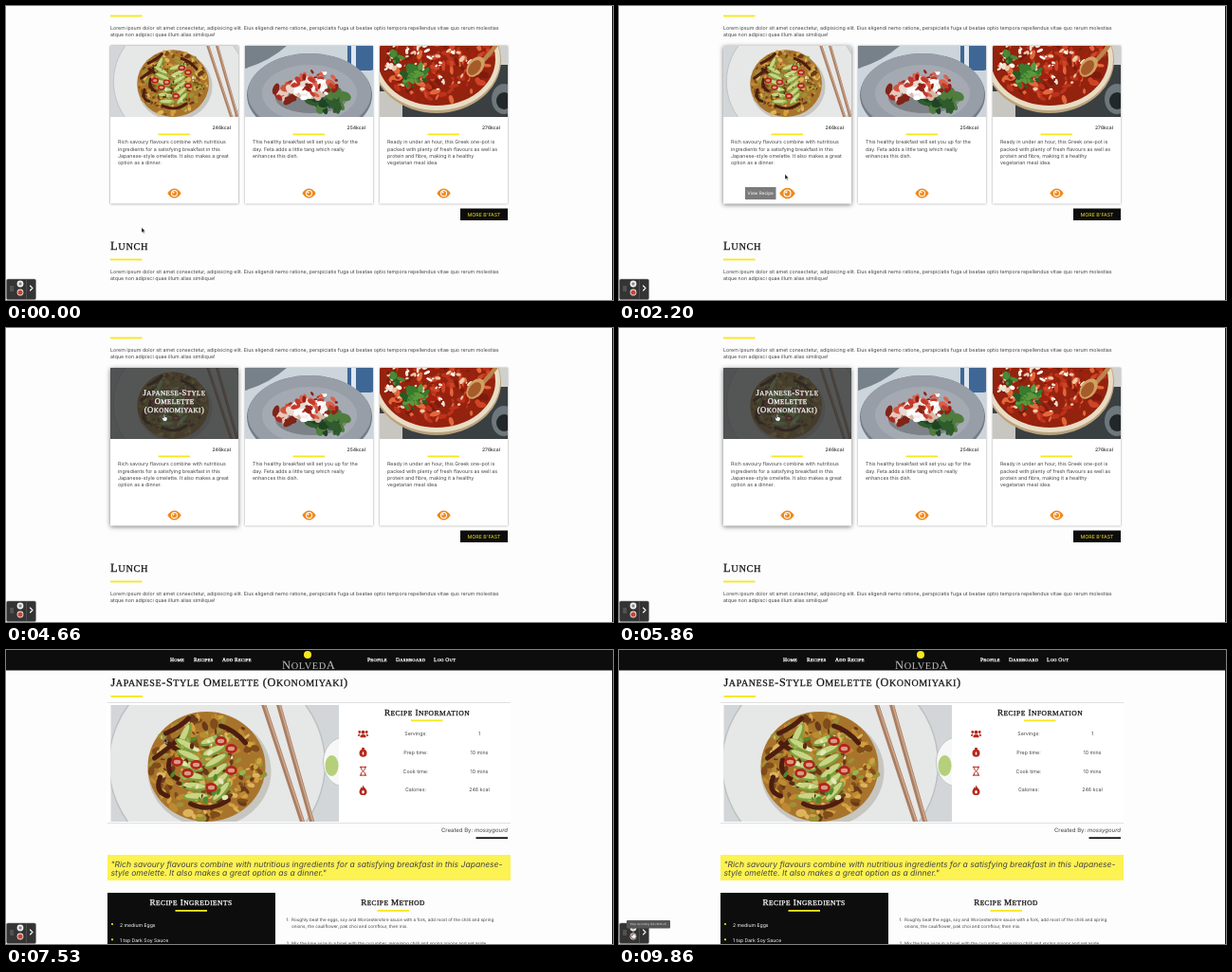
An HTML page for the animation above (10000 ms loop, 640 by 310 pixels).

```html
<!DOCTYPE html>
<html lang="en">
<head>
<meta charset="utf-8">
<title>Recipe cards</title>
<style>
  html, body { margin: 0; height: 100%; overflow: hidden; background: #fdfdfd; }
  #stage { display: block; width: 640px; height: 310px; }
  text { font-family: Inter, sans-serif; fill: #444; white-space: pre; text-rendering: geometricPrecision; }
  .caps { font-family: "Liberation Serif", serif; fill: #111; stroke: #111; stroke-width: .25; letter-spacing: .05em; }
  .light { fill: #fff; stroke: #fff; }
  .mid { text-anchor: middle; }
  .end { text-anchor: end; }
</style>
</head>
<body>
<svg id="stage" viewBox="0 0 640 310"></svg>
<script>
const YELLOW = '#f7e71c', ORANGE = '#f0891c', RED = '#b5291c';

let seed = 7;
const random = () => (seed = (seed * 16807) % 2147483647) / 2147483647;

const rect = (x, y, w, h, fill, more = '') =>
  `<rect x="${x}" y="${y}" width="${w}" height="${h}" fill="${fill}" ${more}/>`;
const oval = (x, y, rx, ry, fill, more = '') =>
  `<ellipse cx="${x}" cy="${y}" rx="${rx}" ry="${ry}" fill="${fill}" ${more}/>`;
const line = (d, color, width, more = '') =>
  `<path d="${d}" fill="none" stroke="${color}" stroke-width="${width}" stroke-linecap="round" ${more}/>`;
const text = (x, y, size, str, more = '') =>
  `<text x="${x}" y="${y}" font-size="${size}" ${more}>${str}</text>`;
const lines = (x, y, size, step, rows, more) =>
  rows.map((row, i) => text(x, y + i * step, size, row, more)).join('');
const caps = (x, y, size, str, cls = '') => text(x, y, size,
  str.replace(/[a-z]+/g, s => `<tspan font-size="${size * .82}">${s.toUpperCase()}</tspan>`),
  `class="caps ${cls}"`);
const rule = (x, y, color = YELLOW) => rect(x, y, 33.5, 1.8, color);

// Irregular food pieces spread over an ellipse
function scatter(n, cx, cy, rx, ry, size, colors) {
  let out = '';
  for (let i = 0; i < n; i++) {
    const a = random() * 6.283, d = Math.sqrt(random());
    const x = cx + Math.cos(a) * d * rx, y = cy + Math.sin(a) * d * ry;
    const w = size * (.5 + random()), h = w * (.35 + random() * .4);
    out += oval(x.toFixed(1), y.toFixed(1), w.toFixed(1), h.toFixed(1), colors[i % colors.length],
      `transform="rotate(${random() * 180 | 0} ${x.toFixed(1)} ${y.toFixed(1)})"`);
  }
  return out;
}

function omelette() {
  let out = rect(-40, -10, 320, 150, '#d3d6d8')
    + oval(112, 62, 114, 108, '#e6e7e7', 'stroke="#bcc1c3" stroke-width="1.5"')
    + oval(104, 70, 65, 59, '#a9a397', 'opacity=".5"')
    + oval(101, 65, 62, 58, '#a8742b')
    + scatter(260, 101, 65, 59, 55, 4, ['#d3a040', '#7f4c1a', '#bd8a31', '#dcb45c', '#69391a', '#9a9238'])
    + line('M58 30Q75 22 82 14M46 56Q62 45 78 30M52 76Q46 92 60 96M62 58Q58 72 70 78M60 40L74 50M116 22Q130 26 142 40M84 104Q104 114 124 100',
      '#4d1e10', 5);
  for (let i = 0; i < 13; i++) {
    const x = 78 + (i * 29) % 56, y = 32 + i * 5.4, turn = -65 + (i * 47) % 100;
    out += `<g transform="translate(${x} ${y}) rotate(${turn})">${oval(0, 0, 14, 4.5, '#7d9f3c')}${oval(0, -1, 12, 3, '#c9d485')}</g>`;
  }
  out += scatter(45, 102, 64, 38, 40, 2.6, ['#4f8a2c', '#8fb950', '#5b2a14', '#e3e9b8']);
  for (const [x, y] of [[116, 38], [127, 46], [90, 63], [81, 72], [127, 69], [106, 87], [70, 60]])
    out += oval(x, y, 5, 3.6, '#d99a80', 'stroke="#b3231d" stroke-width="2.6"');
  return out + line('M160 -4L203 126M176 -4L213 126', '#a97e62', 5) + line('M161 -4L204 126M177 -4L214 126', '#d0aa8e', 1.5)
    + oval(246, 60, 22, 26, '#f6f7f6', 'stroke="#bfc6c6"') + oval(233, 64, 7, 11, '#b5cf7b');
}

const breakfast = () => rect(0, 0, 135, 75, '#ccd5db')
  + '<path d="M0 0H44Q26 16 0 24Z" fill="#76818a"/>'
  + rect(108, -6, 30, 32, '#3f6796', 'rx="6"') + rect(112, 0, 5, 22, '#dfe7ee')
  + oval(68, 52, 66, 44, '#767c86') + oval(68, 50, 65, 42, '#989ea8') + oval(68, 50, 50, 30, '#a5aab2')
  + oval(70, 55, 38, 16, '#7d8288') + scatter(45, 87, 56, 20, 12, 5, ['#2f5b2d', '#4f7d3d', '#1f4424'])
  + scatter(30, 46, 48, 14, 10, 4.5, ['#a82c22', '#d0543f', '#e9c9bb', '#7f2419'])
  + oval(67, 44, 20, 12, '#f1eeea') + scatter(18, 67, 46, 20, 10, 4.5, ['#fff', '#e8dad0', '#d6b9a8'])
  + scatter(45, 74, 41, 24, 14, 3.6, ['#c23a2c', '#dc604c', '#fff', '#8f2219']);

const onePot = () => rect(0, 0, 135, 75, '#3a3f42') + rect(108, 0, 27, 20, '#cfd0cd')
  + rect(0, 48, 24, 27, '#c8c6c0') + oval(131, 56, 13, 16, '#6e777b') + oval(131, 58, 8, 9, '#22272a')
  + oval(60, 15, 68, 56, '#b9a27c') + oval(60, 14, 67, 54, '#e9dcc4') + oval(60, 14, 62, 49, '#93230f')
  + scatter(190, 60, 14, 57, 45, 4, ['#cf4426', '#a3200f', '#e2683b', '#bb331b', '#7f1b0d'])
  + scatter(75, 52, 14, 48, 34, 2.4, ['#fff', '#f2e3d2', '#edc9a8'])
  + scatter(26, 37, 32, 13, 11, 4.2, ['#397a2d', '#59983c', '#265b22'])
  + scatter(9, 18, 12, 8, 6, 4, ['#4a8a35', '#2b6226'])
  + line('M104 20Q116 10 124 -3', '#b9854c', 4.5)
  + oval(101, 22, 8, 12, '#d0a062', 'transform="rotate(38 101 22)"') + oval(100, 23, 5.5, 9, '#a65b2a', 'transform="rotate(38 100 23)"');

const eye = '<path d="M-7.2 0Q-4 -5 0 -5T7.2 0Q4 5 0 5T-7.2 0Z" fill="' + ORANGE + '"/>'
  + oval(0, 0, 3.5, 3.5, '#fff') + oval(0, 0, 2.5, 2.5, ORANGE) + oval(-1, -1, 1, 1, '#fff');

const cards = [
  ['246kcal', `<g transform="translate(4.5 0) scale(.61)">${omelette()}</g>`,
    ['Rich savoury flavours combine with nutritious', 'ingredients for a satisfying breakfast in this', 'Japanese-style omelette. It also makes a great', 'option as a dinner.']],
  ['254kcal', breakfast(),
    ['This healthy breakfast will set you up for the', 'day. Feta adds a little tang which really', 'enhances this dish.']],
  ['276kcal', onePot(),
    ['Ready in under an hour, this Greek one-pot is', 'packed with plenty of fresh flavours as well as', 'protein and fibre, making it a healthy', 'vegetarian meal idea.']]
];

const card = ([kcal, photo, copy], i) => {
  const x = 110 + 142 * i;
  return rect(x, 42, 135, 166.5, '#fff', `id="card${i}" style="filter:drop-shadow(0 .7px .8px #0006)"`)
    + `<svg x="${x}" y="42" width="135" height="75">${photo}</svg>`
    + text(x + 127, 130, 5, kcal, 'class="end" font-weight="600"')
    + rule(x + 50.5, 134.5) + lines(x + 8, 145.2, 5.3, 7.4, copy)
    + `<g id="eye${i}" transform="translate(${x + 67.5} 197.5)">${eye}</g>`;
};

const lorem = ['Lorem ipsum dolor sit amet consectetur, adipisicing elit. Eius eligendi nemo ratione, perspiciatis fuga ut beatae optio tempora repellendus vitae quo rerum molestias',
  'atque non adipisci quae illum alias similique!'];

const listPage = rule(110, 9.6) + lines(110, 25, 5.3, 7.4, lorem) + cards.map(card).join('')
  + `<g id="shade">${rect(110, 42, 135, 75, '#292c2b', 'opacity=".77"')}`
  + ['Japanese-Style', 'Omelette', '(Okonomiyaki)'].map((s, i) => caps(177.5, 71.2 + 9 * i, 8.6, s, 'light mid')).join('') + '</g>'
  + `<g id="tip">${rect(133, 191, 32.5, 13, '#333')}${text(149.2, 199.2, 4.7, 'View Recipe', 'class="mid" style="fill:#fff"')}</g>`
  + rect(479, 213.5, 50, 12.5, '#0c0c0c') + text(504, 221.6, 5.3, "MORE B'FAST", `class="mid" style="fill:${YELLOW}"`)
  + caps(110, 256.8, 12.6, 'Lunch') + rule(110, 266.5) + lines(110, 282, 5.3, 7.4, lorem);

const flame = '<path d="M0 -5C1 -2 4 -1 4 2A4 3.6 0 0 1 -4 2C-4 0 -2.5 -1 -2 -3L-1 -2Z" fill="' + RED + '"/>' + oval(0, 2.3, 1.3, 1.8, '#fff');
const icons = [
  oval(0, -1.6, 1.9, 1.9, RED) + oval(-3.7, -1.8, 1.4, 1.4, RED) + oval(3.7, -1.8, 1.4, 1.4, RED)
    + `<path d="M-3 4V2Q-2 .8 0 .8T3 2V4ZM-5.7 2.5Q-5.5 0 -3.2 .2L-3.7 2.5ZM5.7 2.5Q5.5 0 3.2 .2L3.7 2.5Z" fill="${RED}"/>`,
  oval(0, .8, 4, 4, RED) + rect(-1.4, -5, 2.8, 2.5, RED) + oval(0, 1, .8, 1.7, '#fff'),
  line('M-3.2 -4.4H3.2M-3.2 4.4H3.2M-2.5 -4.4Q-2.5 -1.5 0 0Q2.5 1.5 2.5 4.4M2.5 -4.4Q2.5 -1.5 0 0Q-2.5 1.5 -2.5 4.4', RED, 1),
  flame
];
const facts = [['Servings:', '1'], ['Prep time:', '10 mins'], ['Cook time:', '10 mins'], ['Calories:', '246 kcal']];
const nav = [[173, 'Home'], [198, 'Recipes'], [228, 'Add Recipe'], [381, 'Profile'], [411, 'Dashboard'], [451, 'Log Out']];

const recipePage = rect(0, 0, 640, 21.5, '#0d0d0d') + nav.map(([x, s]) => caps(x, 12.2, 5.5, s, 'light')).join('')
  + oval(318, 5, 4, 4, YELLOW) + text(291, 20, 12.6, 'N<tspan font-size="10.3">OLVED</tspan>A', 'class="caps" style="fill:#c4c4c4;stroke:none"')
  + caps(110.5, 38.2, 12.2, 'Japanese-Style Omelette (Okonomiyaki)') + rule(110.5, 48)
  + rect(107, 55.5, 425, 127, '#fff', 'style="filter:drop-shadow(0 .4px .7px #0007)"')
  + `<svg x="110.5" y="58" width="240.5" height="123">${omelette()}</svg>`
  + caps(444, 68.8, 9.2, 'Recipe Information', 'mid') + rule(427, 73.5)
  + facts.map(([name, value], i) => {
    const y = 88.3 + 19.7 * i;
    return `<g transform="translate(376.5 ${y})">${icons[i]}</g>`
      + text(432, y + 2, 5.3, name, 'class="mid"') + text(499, y + 2, 5.3, value, 'class="mid"');
  }).join('')
  + text(529, 191.8, 6, 'Created By: <tspan font-style="italic">mossygourd</tspan>', 'class="end"') + rule(495.5, 197.3, '#111')
  + rect(107, 216, 425, 27, '#fcf251')
  + lines(110.5, 229, 8.55, 9.1, ['"Rich savoury flavours combine with nutritious ingredients for a satisfying breakfast in this Japanese-',
    'style omelette. It also makes a great option as a dinner."'], 'font-style="italic"')
  + rect(107, 256, 177, 54, '#0d0d0d') + caps(195, 268.8, 9.1, 'Recipe Ingredients', 'light mid') + rule(178.5, 274)
  + ['2 medium Eggs', '1 tsp Dark Soy Sauce'].map((s, i) => oval(112, 289 + 16.3 * i, 1.1, 1.1, YELLOW)
    + text(120, 291.8 + 16.6 * i, 5.15, s, 'style="fill:#fff"')).join('')
  + caps(408, 268.8, 9, 'Recipe Method', 'mid') + rule(391.5, 274)
  + text(295.5, 285.7, 4.6, '1.') + text(295.5, 311.2, 4.6, '2.')
  + lines(301, 285.7, 4.6, 7.5, ['Roughly beat the eggs, soy and Worcestershire sauce with a fork, add most of the chilli and spring', 'onions, the cauliflower, pak choi and cornflour, then mix.'])
  + text(301, 311.2, 4.6, 'Mix the lime juice in a bowl with the cucumber, remaining chilli and spring onions and set aside.');

const recorder = rect(.5, 288, 31, 21.5, '#343434', 'rx="1.5" stroke="#777" stroke-width=".5"')
  + [0, 1, 2].map(i => rect(4.6, 295.5 + 2 * i, 1, 1, '#aaa') + rect(6.6, 295.5 + 2 * i, 1, 1, '#aaa')).join('')
  + oval(15, 293, 3.4, 3.4, '#f4f4f4') + rect(13.7, 291.5, .9, 3, '#444') + rect(15.4, 291.5, .9, 3, '#444')
  + oval(15, 302, 3.4, 3.4, '#eee') + oval(15, 302, 2.6, 2.6, '#c9452f')
  + line('M21.5 288.5V309', '#666', .5) + line('M25.5 295L28 297.5L25.5 300', '#fff', 1.1)
  + `<g id="recTip">${rect(8, 285, 46, 8.5, '#555', 'rx="1"')}${text(31, 290.4, 2.9, 'Stop recording (Alt+Shift+E)', 'class="mid" style="fill:#ddd"')}</g>`;

const cursor = '<g id="cursor"><path id="arrow" d="M0 -1.5V4L1.3 2.9L2.1 4.8L3 4.4L2.2 2.6H3.9Z" fill="#111" stroke="#fff" stroke-width=".4"/>'
  + '<path id="hand" d="M-.7 -2.5Q0 -3.3 .6 -2.5V-.3L3 .3V2.5L2.2 4.2H-1L-2.8 1L-2 .3L-.7 1.3Z" fill="#fff" stroke="#222" stroke-width=".5"/></g>';

const $ = id => document.getElementById(id);
$('stage').innerHTML = `<g id="list">${listPage}</g><g id="recipe">${recipePage}</g>${rect(639, 0, 1, 310, '#111')}${recorder}${cursor}`;

const ramp = (t, from, to) => {
  const k = Math.min(1, Math.max(0, (t - from) / (to - from)));
  return k * k * (3 - 2 * k);
};
const path = [[0, 143, 235], [200, 143, 235], [850, 177, 200], [1900, 177, 200], [2950, 167, 94], [8300, 167, 94], [9350, 15, 300], [10000, 15, 300]];

function pointer(t) {
  const i = path.findIndex(p => p[0] > t), [t0, x0, y0] = path[i - 1], [t1, x1, y1] = path[i];
  const k = ramp(t, t0, t1);
  return [x0 + (x1 - x0) * k, y0 + (y1 - y0) * k];
}

const show = (id, opacity) => { $(id).style.opacity = opacity; };

function draw(now) {
  const t = now % 10000, [x, y] = pointer(t), onRecipe = t >= 6130;
  const overEye = ramp(t, 700, 950) - ramp(t, 2100, 2350), lift = ramp(t, 600, 900);
  $('list').style.display = onRecipe ? 'none' : '';
  $('recipe').style.display = onRecipe ? '' : 'none';
  show('tip', overEye);
  show('shade', ramp(t, 2750, 3450));
  show('recTip', +(t >= 9460));
  $('eye0').setAttribute('transform', `translate(177.5 197.5) scale(${1 + .25 * overEye})`);
  $('card0').style.filter = `drop-shadow(0 ${.7 + lift}px ${.8 + 1.7 * lift}px #0008)`;
  $('cursor').setAttribute('transform', `translate(${x} ${y})`);
  const hand = (t > 750 && t < 2100) || (t > 2750 && !onRecipe) || t > 9300;
  show('hand', +hand);
  show('arrow', +!hand);
}

const start = performance.now();
(function loop() {
  draw(performance.now() - start);
  requestAnimationFrame(loop);
})();
</script>
</body>
</html>
```
